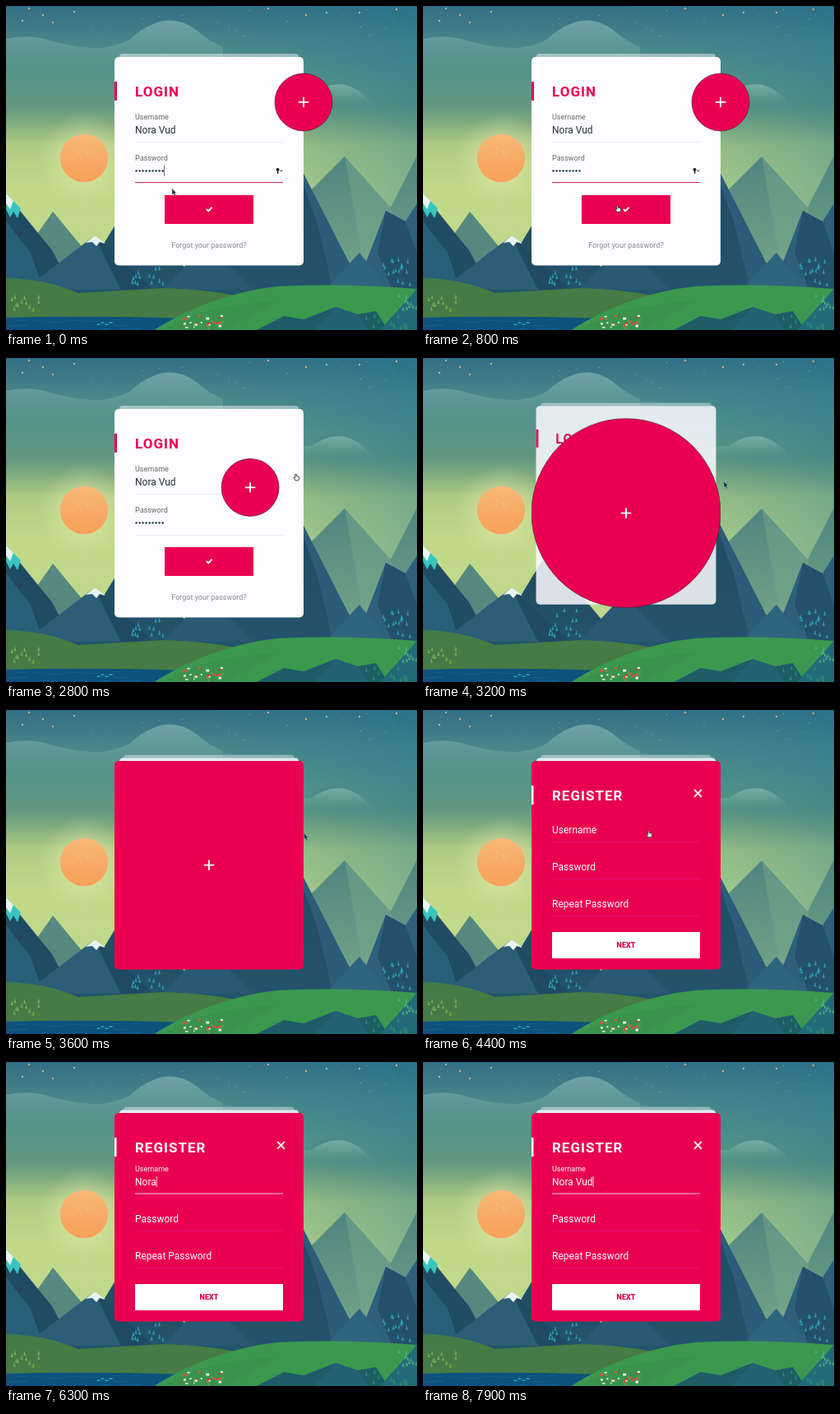
An HTML page for the animation above (8 s loop, 500x394 px).

```html
<!DOCTYPE html>
<html lang="en">
<head>
<meta charset="utf-8">
<title>Login and register card</title>
<style>
  html, body { margin: 0; width: 100%; height: 100%; overflow: hidden; background: #35708a; }
  svg { display: block; width: 500px; height: 394px; }
  text { font-family: Roboto, "Liberation Sans", sans-serif; font-size: 12px; white-space: pre; }
  .title { font-size: 17px; font-weight: 700; letter-spacing: 1px; }
  .small { font-size: 9px; }
</style>
</head>
<body>
<svg viewBox="0 0 500 394">
  <defs>
    <linearGradient id="sky" x2="0" y2="1">
      <stop offset="0" stop-color="#326e84"/>
      <stop offset=".1" stop-color="#47838a"/>
      <stop offset=".22" stop-color="#579389"/>
      <stop offset=".31" stop-color="#629880"/>
      <stop offset=".37" stop-color="#87af7e"/>
      <stop offset=".43" stop-color="#aecb83"/>
      <stop offset=".56" stop-color="#c0d988"/>
      <stop offset=".75" stop-color="#bfd88b"/>
    </linearGradient>
    <linearGradient id="haze">
      <stop offset=".45" stop-color="#2c7f90" stop-opacity="0"/>
      <stop offset="1" stop-color="#1f7590" stop-opacity=".4"/>
    </linearGradient>
    <linearGradient id="cloud" x2="0" y2="1">
      <stop offset="0" stop-color="#a5cfc4" stop-opacity=".5"/>
      <stop offset="1" stop-color="#83b8a4" stop-opacity="0"/>
    </linearGradient>
    <linearGradient id="sun" x2="0" y2="1">
      <stop offset="0" stop-color="#f6b877"/>
      <stop offset="1" stop-color="#f9a05a"/>
    </linearGradient>
    <radialGradient id="glow">
      <stop offset=".45" stop-color="#fff5c4" stop-opacity=".32"/>
      <stop offset="1" stop-color="#e6efae" stop-opacity="0"/>
    </radialGradient>
    <linearGradient id="far" x2="0" y2="1">
      <stop offset="0" stop-color="#4f8580"/>
      <stop offset="1" stop-color="#78a888"/>
    </linearGradient>
    <linearGradient id="navy" x2="0" y2="1">
      <stop offset="0" stop-color="#1f4960"/>
      <stop offset="1" stop-color="#24536c"/>
    </linearGradient>
    <clipPath id="cardClip"><rect x="132" y="62" width="230" height="253.500" rx="5"/></clipPath>
  </defs>

  <g id="scene"></g>

  <g id="login">
    <path d="M138 62v-1q0-3 4-3h210q4 0 4 3v1z" fill="#fff" opacity=".45"/>
    <rect x="132" y="62" width="230" height="253.500" rx="5" fill="#fdfcff"/>
    <rect x="132" y="92" width="3" height="23" fill="#ea0050"/>
    <text class="title" x="157" y="110" fill="#ea0050">LOGIN</text>
    <text class="small" x="157" y="138" fill="#666">Username</text>
    <text x="157" y="154.5" fill="#263038" id="savedName"></text>
    <text class="small" x="157" y="188" fill="#666">Password</text>
    <path d="M157 165.500h180M157 215.500h180" stroke="#ececf0"/>
    <g id="dots" fill="#2a4656"></g>
    <path id="passCaret" d="M192.500 194v13" stroke="#555" stroke-width=".8"/>
    <path id="passLine" d="M-90 214.500h180" stroke="#d92a5c"/>
    <g id="key" fill="#222">
      <circle cx="330.500" cy="199" r="2"/><path d="M330 200h1.300v4h-1.300z"/>
      <path d="M333.200 199.500l1.600 1.700 1.600-1.700" fill="none" stroke="#222"/>
    </g>
    <rect x="193" y="230" width="108" height="35" fill="#ea0050"/>
    <path d="M243.800 247l2.400 2.400 4.400-4.700" fill="none" stroke="#fff" stroke-width="2"/>
    <text class="small" x="247" y="294" text-anchor="middle" fill="#8a8a90">Forgot your password?</text>
  </g>

  <g id="overlay"><circle id="disc" fill="#ea0050" stroke="#4a1038" stroke-width=".6"/></g>

  <g id="register" fill="#fff">
    <rect x="132" y="92" width="2.500" height="23"/>
    <text class="title" x="157" y="110">REGISTER</text>
    <text x="157" id="nameLabel">Username</text>
    <text x="157" y="150" id="typed"></text>
    <text x="157" y="195">Password</text>
    <text x="157" y="240">Repeat Password</text>
    <path d="M157 160.500h180M157 205.500h180M157 250.500h180" stroke="#e6107e" stroke-width=".9"/>
    <path id="nameLine" d="M-90 160h180" stroke="#ffc4d8"/>
    <path id="nameCaret" d="M0 139v13" stroke="#fff" stroke-width=".8"/>
    <rect x="157" y="270" width="180" height="32"/>
    <text x="247" y="289.300" text-anchor="middle" fill="#d9004f" style="font-size:9px;font-weight:800">NEXT</text>
  </g>

  <path id="cross" d="M-6.200 0h12.400M0-6.200v12.400" stroke="#fff" stroke-width="1.900"/>

  <g id="pointer" stroke-linejoin="round">
    <path id="arrow" d="M0 0v7.500l1.800-1.500 1.300 2.900 1.300-.6-1.300-2.800h2.200z" fill="#17364a" stroke="#9fb6bc" stroke-width=".4"/>
    <path id="hand" d="M-1.300 1.600q1.100-1.200 1.700 0v2q3.200 0 3.200 1.500v1.800l-.9 2h-3.700l-2.100-3.100q.2-1.300 1.800 0z" fill="#f4f4f6" stroke="#333" stroke-width=".9"/>
  </g>
</svg>

<script>
const LOOP = 8000, STEP = 100;
const NAME = "Nora Vud";
const $ = id => document.getElementById(id);
const set = (el, attrs) => { for (const k in attrs) el.setAttribute(k, attrs[k]); return el; };
const add = (parent, tag, attrs) =>
  parent.appendChild(set(document.createElementNS("http://www.w3.org/2000/svg", tag), attrs));

let seed = 7;
const rnd = (a, b) => {
  seed = (seed * 16807) % 2147483647;
  return a + (b - a) * seed / 2147483647;
};

function drawScene() {
  const g = $("scene");
  const shape = (d, fill, more) => add(g, "path", { d, fill, ...more });
  const dot = (cx, cy, r, fill, opacity = 1) => add(g, "circle", { cx, cy, r, fill, opacity });
  const trees = (n, x0, x1, y0, y1, h, fill) => {
    for (let i = 0; i < n; i++) {
      const x = rnd(x0, x1), y = rnd(y0, y1);
      shape(`M${x} ${y - h}l${h * .25} ${h}h${-h * .5}z`, fill);
    }
  };

  add(g, "rect", { width: 500, height: 394, fill: "url(#sky)" });
  add(g, "rect", { width: 500, height: 394, fill: "url(#haze)" });
  for (let i = 0; i < 34; i++) dot(rnd(0, 500), rnd(0, 40), rnd(.3, .7), "#b5d0cd", .6);
  for (const [x, y] of [[28, 3], [45, 11], [57, 20], [83, 7], [20, 18], [319, 3], [365, 11], [390, 8], [430, 8], [475, 4]])
    dot(x, y, 1.2, "#e5b184", .9);

  shape("M0 40Q25 34 50 41Q80 50 108 51Q132 51 150 41Q172 21 193 18Q212 15 230 28Q246 42 264 50V85H0z", "url(#cloud)");
  shape("M325 120Q350 106 372 107Q393 92 413 96Q434 102 446 120z", "url(#cloud)");

  dot(95, 185, 56, "url(#glow)");
  dot(95, 185, 29.2, "url(#sun)");
  for (let i = 0; i < 9; i++) dot(rnd(89, 102), rnd(174, 190), .7, "#fbd9a8", .7);

  // distant ridges
  shape("M330 345V265L412 183L468 245L500 182V345z", "url(#far)");
  shape("M412 183L468 245L490 345H440z", "#78a98a", { opacity: .45 });
  shape("M15 310L57 250L115 320V345H15z", "#56887f");

  // near mountains stand on a shared base
  add(g, "rect", { y: 335, width: 500, height: 35, fill: "#24536c" });
  shape("M85 345L150 238L240 345z", "url(#navy)");
  shape("M215 345L342 165L434 345z", "url(#navy)");
  shape("M342 165L378 262L398 345H434z", "#2c5c78");
  shape("M190 345L244 288L300 345z", "#2a5973");
  shape("M425 345L462 249L486 262L500 240V345z", "#2e607c");
  shape("M462 249L452 300L470 345H500V300L486 262z", "#24506b");
  shape("M388 345L430 300L466 345z", "#2f6480");
  shape("M0 228L56 297L82 345H0z", "#1f4c63");
  shape("M0 262L30 300L45 345H0z", "#296079");
  shape("M22 345L108 279L180 345z", "#2c5e78");
  shape("M108 279L122 310L140 345H180z", "#204a63");
  shape("M0 228L18 246L14 258L9 250L5 257L0 247z", "#39c6c0");
  shape("M0 228L9 237L5 247L0 240z", "#e5f6ee");
  shape("M97 288L108 279L121 289L114 287L110 292L105 287z", "#e8f3ef");
  trees(17, 153, 191, 308, 341, 6, "#2a9bab");
  trees(17, 451, 492, 306, 341, 6, "#2a97a9");

  // hills, water and shore
  shape("M0 331Q45 331 88 349Q140 346 190 343Q240 344 285 353V394H0z", "#467a47");
  shape("M0 379Q100 376 222 380L195 394H0z", "#0d527e");
  for (let i = 0; i < 12; i++)
    add(g, "rect", { x: rnd(0, 170), y: rnd(381, 393), width: rnd(8, 25), height: .6, fill: "#2576a0", opacity: .6 });
  shape("M180 394Q250 350 330 341Q410 337 500 344V394z", "#3b984f");
  shape("M190 394Q250 360 330 360Q290 380 270 394z", "#378f4c", { opacity: .6 });
  trees(12, 5, 40, 355, 372, 6, "#7aa455");
  shape("M305 394L338 377L362 381L401 366L428 375L450 371L462 390L500 344V394z", "#1e5c66");
  shape("M375 394L401 366L428 375L440 394z", "#226273");
  shape("M455 394L500 344V394z", "#226a7a");
  trees(11, 478, 500, 354, 372, 5, "#4fae86");
  trees(12, 425, 490, 378, 394, 6, "#238a72");

  // village and boats
  const paint = ["#f4eee0", "#e2533e", "#5f9a56", "#fff", "#c43b3b"];
  for (let i = 0; i < 28; i++)
    add(g, "rect", { x: rnd(211, 266), y: rnd(375, 391), width: rnd(1.5, 4), height: rnd(1.5, 3), fill: paint[i % 5] });
  for (let i = 0; i < 4; i++) shape(`M${110 + i * 5} ${388 - i % 2 * 2}l2-2 4 2z`, "#2fa0bb");
}

const clamp = v => Math.min(1, Math.max(0, v));
const part = (t, a, b) => clamp((t - a) / (b - a));
const swing = p => .5 - Math.cos(p * Math.PI) / 2;
const ease = (t, a, b) => swing(part(t, a, b));
const mix = (a, b, p) => a + (b - a) * p;

// time, x, y of the pointer tip
const TRACK = [
  [0, 202, 222], [300, 203, 223], [1000, 245, 246], [1900, 245, 246], [2500, 353, 140],
  [2800, 353, 140], [3200, 366, 150], [3500, 366, 150], [4300, 275, 146], [8000, 275, 146]
];
const HAND = [[800, 2000], [2300, 2900], [4000, 5500]];
const KEYS = [5500, 5700, 5900, 6100, 6600, 7000, 7300, 7600];

function trackAt(t) {
  const i = TRACK.findIndex(k => k[0] > t);
  const a = TRACK[i - 1], b = TRACK[i], p = ease(t, a[0], b[0]);
  return [mix(a[1], b[1], p), mix(a[2], b[2], p)];
}

const show = (id, on) => set($(id), { opacity: +on });
const spread = (id, p) => set($(id), { transform: `translate(247 0) scale(${p} 1)`, opacity: p > 0 ? 1 : 0 });

function render(t) {
  // login card
  show("passCaret", t < 1300 && t % 1000 < 500);
  show("key", t < 1300);
  spread("passLine", 1 - ease(t, 1300, 1600));
  const back = ease(t, 2850, 3250), s = mix(1, .95, back);
  set($("login"), {
    transform: `translate(${247 * (1 - s)} ${mix(0, -.7, back)}) scale(${s} ${s})`,
    opacity: mix(1, .84, back)
  });

  // plus disc: glides to the centre, then grows inside the card
  const glide = part(t, 2660, 2908);
  const x = mix(362, 247, glide), y = mix(117, 188.6, glide);
  set($("disc"), { cx: x, cy: y, r: mix(35, 175, ease(t, 2900, 3450)) });
  if (t >= 2900) set($("overlay"), { "clip-path": "url(#cardClip)" });
  else $("overlay").removeAttribute("clip-path");
  const turn = ease(t, 3600, 3900);
  set($("cross"), {
    transform: `translate(${mix(x, 334.5, turn)} ${mix(y, 101.3, turn)}) rotate(${45 * turn})`
  });

  // register form
  set($("register"), { opacity: ease(t, 3600, 3900) });
  const focus = ease(t, 4700, 5000);
  set($("nameLabel"), { y: mix(150, 133, focus) }).style.fontSize = mix(12, 9, focus) + "px";
  spread("nameLine", focus);
  const count = KEYS.filter(k => k <= t).length;
  $("typed").textContent = NAME.slice(0, count);
  const last = count ? KEYS[count - 1] : 4700;
  show("nameCaret", t >= 4700 && (t - last) % 1000 < 500);
  set($("nameCaret"), { transform: `translate(${157.5 + $("typed").getComputedTextLength()} 0)` });

  // pointer
  const [px, py] = trackAt(t);
  const hand = HAND.some(([a, b]) => t >= a && t < b);
  set($("pointer"), { transform: `translate(${px} ${py})` });
  show("pointer", t < 5500);
  show("hand", hand);
  show("arrow", !hand);
}

drawScene();
$("savedName").textContent = NAME;
for (let i = 0; i < 9; i++) add($("dots"), "circle", { cx: 158.6 + i * 4, cy: 200.5, r: 1.35 });

const start = performance.now();
function tick() {
  const t = (performance.now() - start) % LOOP;
  render(Math.floor(t / STEP) * STEP);
  requestAnimationFrame(tick);
}
tick();
</script>
</body>
</html>
```
